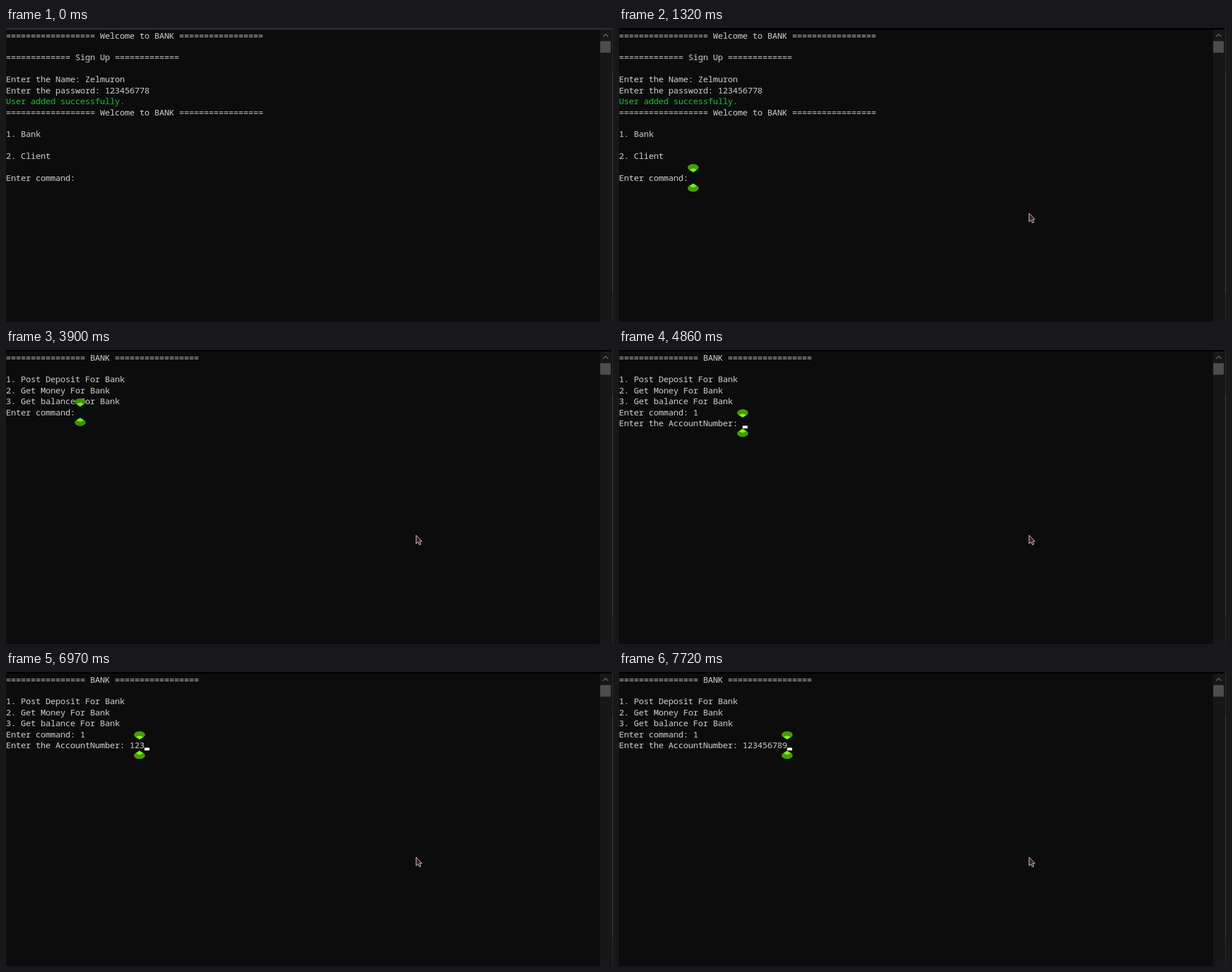
An HTML page with a canvas that plays this animation: 1074x521 px, repeating every 8000 ms.

```html
<!DOCTYPE html>
<html lang="en">
<head>
<meta charset="utf-8">
<title>Bank console</title>
<style>
  html, body { margin: 0; width: 100%; height: 100%; overflow: hidden; background: #0c0c0c; }
  canvas { display: block; }
</style>
</head>
<body>
<canvas id="stage" width="1074" height="521"></canvas>
<script>
const ctx = document.getElementById('stage').getContext('2d');
const W = 1074, H = 521, LOOP = 8000;
const COL = 8.75, ROW = 19.43;
const GRAY = '#d0d0d0', GREEN = '#10c434';

const bar = n => '='.repeat(n);
const welcome = `${bar(18)} Welcome to BANK ${bar(17)}`;
const signUp = [
  welcome, '', `${bar(13)} Sign Up ${bar(13)}`, '',
  'Enter the Name: Zelmuron', 'Enter the password: 123456778',
  'User added successfully.', welcome, '', '1. Bank', '', '2. Client', '',
  'Enter command: '
];
const bankMenu = [
  `${bar(16)} BANK ${bar(17)}`, '', '1. Post Deposit For Bank',
  '2. Get Money For Bank', '3. Get balance For Bank', 'Enter command: '
];
const accountPrompt = 'Enter the AccountNumber: ';

// Times at which each account digit is typed, and how long the marker lags behind.
const digitTimes = [6680, 6870, 6970, 7092, 7214, 7336, 7458, 7580, 7700];
const MARKER_LAG = 20;
const typedAt = t => digitTimes.filter(d => t >= d).length;

// Whether the caret is lit: it flips at every listed time.
const blinkTimes = [820, 1320, 1840, 2350, 2870, 3900, 4210, 4420, 4840, 5440, 5960, 6480, 6680];
const caretLit = t => blinkTimes.filter(b => t >= b).length % 2 === 1;

function fill(color, x, y, w, h) {
  ctx.fillStyle = color;
  ctx.fillRect(x, y, w, h);
}

function drawLines(lines) {
  ctx.font = '500 15px "Noto Sans Mono", monospace';
  lines.forEach((line, row) => {
    ctx.fillStyle = line.startsWith('User added') ? GREEN : GRAY;
    [...line].forEach((ch, col) => {
      if (ch !== ' ') ctx.fillText(ch, col * COL - 0.1, 18.55 + row * ROW);
    });
  });
}

function drawCaret(col, row) {
  fill('#ffffff', col * COL, 17.6 + row * ROW, COL, 4.86);
}

// Green text-cursor marker: two mirrored lobes pointing at the caret.
function drawMarker(col, row, alpha = 1) {
  for (const side of [-1, 1]) {
    ctx.save();
    ctx.globalAlpha = alpha;
    ctx.translate(col * COL, 13 + row * ROW);
    ctx.scale(1, side);
    ctx.fillStyle = '#469b05';
    ctx.beginPath();
    ctx.moveTo(0, 10);
    ctx.lineTo(-8, 14.8);
    ctx.bezierCurveTo(-12.5, 18.5, -8, 24.5, 0, 24.5);
    ctx.bezierCurveTo(8, 24.5, 12.5, 18.5, 8, 14.8);
    ctx.closePath();
    ctx.fill();
    ctx.fillStyle = '#76ff03';
    ctx.beginPath();
    ctx.moveTo(0, 10);
    ctx.lineTo(-6.3, 14.2);
    ctx.quadraticCurveTo(0, 19.6, 6.3, 14.2);
    ctx.closePath();
    ctx.fill();
    ctx.restore();
  }
}

function drawPointer(t) {
  if (t < 210) return;
  const p = Math.min(1, Math.floor((t - 210) / 33.85) / 13);
  const ease = p * (2 - p);
  ctx.save();
  ctx.translate(1000 - 275 * ease, 510 - 183 * ease);
  ctx.beginPath();
  ctx.moveTo(0.6, 1.2);
  ctx.lineTo(0.6, 16.3);
  ctx.lineTo(4, 13.2);
  ctx.lineTo(6.4, 18.3);
  ctx.lineTo(9, 17.2);
  ctx.lineTo(6.8, 12.3);
  ctx.lineTo(11, 12);
  ctx.closePath();
  ctx.fillStyle = '#3f241b';
  ctx.fill();
  ctx.strokeStyle = '#e4ded9';
  ctx.lineWidth = 1;
  ctx.stroke();
  ctx.restore();
}

function drawClick() {
  ctx.fillStyle = 'rgba(255, 255, 0, 0.47)';
  ctx.beginPath();
  ctx.arc(723.5, 326.5, 14.5, 0, Math.PI * 2);
  ctx.fill();
}

function drawWindow(focused) {
  fill('#0c0c0c', 0, 0, W, H);
  fill(focused ? '#000000' : '#2b2b2b', 0, 0, W, 3);
  fill('#171717', 1051, 3, 20, H - 3);
  fill('#4d4d4d', 1051.4, 23.3, 18.6, 20.4);
  fill('#303030', 1072, 0, 1, H);
  fill('#1a1a1a', 1073, 0, 1, H);
  fill('#3a3a3a', 1073, 78, 1, 392);
  ctx.strokeStyle = '#686868';
  ctx.lineWidth = 1.5;
  ctx.beginPath();
  ctx.moveTo(1056.5, 15.5);
  ctx.lineTo(1061, 11);
  ctx.lineTo(1065.5, 15.5);
  ctx.stroke();
}

// Screen contents with caret and marker positions as [column, row].
function screenAt(t) {
  if (t < 2910) {
    const typed = t >= 1990;
    const lines = typed ? [...signUp.slice(0, -1), 'Enter command: 1'] : signUp;
    const col = typed ? 16 : 15;
    return { lines, caret: t >= 2890 ? [0, 14] : [col, 13], marker: [col, 13] };
  }
  if (t < 4210) {
    const moved = t >= 2940;
    return { lines: bankMenu, caret: [15, 5], marker: moved ? [15, 5] : [16, 13], alpha: moved ? 0.9 : 1 };
  }
  const lines = [...bankMenu.slice(0, -1), 'Enter command: 1'];
  if (t < 4840) {
    return { lines, caret: [16, 5], marker: [t < 4230 ? 15 : 16, 5] };
  }
  const count = typedAt(t);
  lines.push(accountPrompt + '123456789'.slice(0, count));
  const markerCount = count < 2 ? count : typedAt(t - MARKER_LAG);
  return {
    lines,
    caret: [25 + count, 6],
    marker: t < 4860 ? [16, 5] : [25 + markerCount, 6]
  };
}

function draw(t) {
  const focused = t >= 820;
  const screen = screenAt(t);
  drawWindow(focused);
  drawLines(screen.lines);
  if (caretLit(t)) drawCaret(...screen.caret);
  if (focused) drawMarker(...screen.marker, screen.alpha);
  drawPointer(t);
  if (t >= 800 && t < 1010) drawClick();
}

const start = performance.now();
function tick() {
  draw((performance.now() - start) % LOOP);
  requestAnimationFrame(tick);
}
tick();
</script>
</body>
</html>
```
